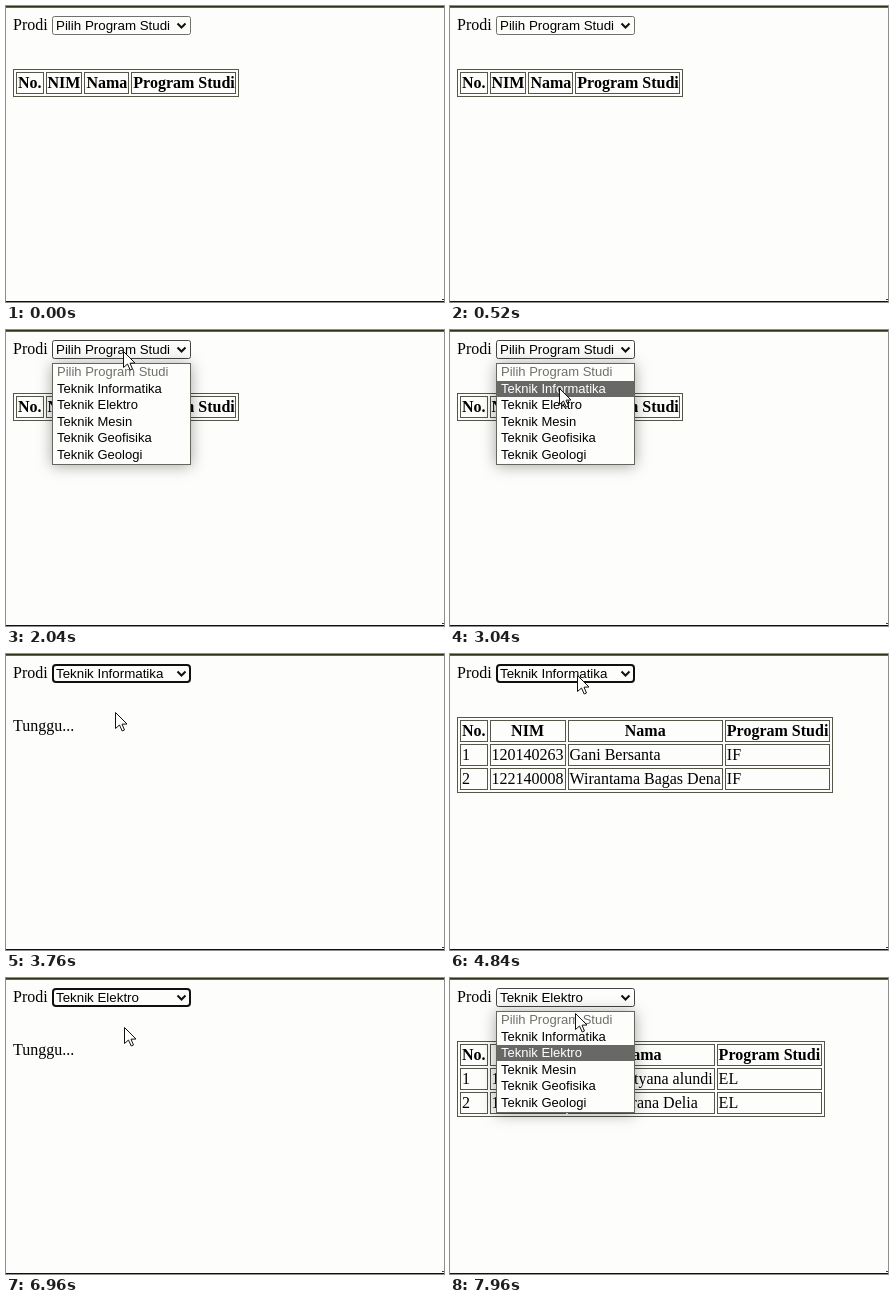
These frames come from a looping animation (438 px wide and 296 px high, 8000 ms). An HTML page with a canvas:

```html
<!DOCTYPE html>
<html lang="id">
<head>
<meta charset="utf-8">
<title>Prodi</title>
<style>
html, body { margin: 0; width: 100%; height: 100%; overflow: hidden; background: #fdfdfb; }
canvas { display: block; }
</style>
</head>
<body>
<canvas id="stage" width="438" height="296"></canvas>
<script>
const ctx = document.getElementById('stage').getContext('2d', { alpha: false });
const LOOP = 8000, WIDTH = 438, HEIGHT = 296;
const PAPER = '#fdfdfb', INK = '#000', LINE = '#55554c';
const SERIF = '16px "Liberation Serif", "Times New Roman", serif';
const BOLD = 'bold ' + SERIF;
const SELECT_FONT = '13.333px "Liberation Sans", Arial, sans-serif';
const MENU_FONT = '13px "Liberation Sans", Arial, sans-serif';
const ROW = 24, OPTION = 16.5;

const OPTIONS = ['Pilih Program Studi', 'Teknik Informatika', 'Teknik Elektro',
  'Teknik Mesin', 'Teknik Geofisika', 'Teknik Geologi'];
const HEADERS = ['No.', 'NIM', 'Nama', 'Program Studi'];
const STUDENTS = {
  empty: [],
  informatika: [
    ['1', '120140263', 'Gani Bersanta', 'IF'],
    ['2', '122140008', 'Wirantama Bagas Dena', 'IF']
  ],
  elektro: [
    ['1', '120130027', 'Hendra setyana alundi', 'EL'],
    ['2', '121130045', 'Wulan Kirana Delia', 'EL']
  ]
};

// Page states, each holding from its start time.
const STATES = [
  { at: 0, selected: 0, view: 'empty' },
  { at: 1960, selected: 0, view: 'empty', open: true },
  { at: 3120, selected: 1, view: 'wait', focus: true },
  { at: 4160, selected: 1, view: 'informatika', focus: true },
  { at: 5080, selected: 1, view: 'informatika', open: true },
  { at: 5960, selected: 2, view: 'wait', focus: true },
  { at: 7080, selected: 2, view: 'elektro', focus: true },
  { at: 7840, selected: 2, view: 'elektro', open: true }
];

// The pointer enters from above, then eases to each spot and rests there.
const ENTRY = { x: 124, y: -20 };
const MOVES = [
  { from: 1560, to: 2120, x: 118, y: 23 },
  { from: 2360, to: 2600, x: 110, y: 58 },
  { from: 4600, to: 4840, x: 128, y: 21 },
  { from: 5160, to: 5600, x: 113, y: 71 },
  { from: 6720, to: 6960, x: 119, y: 49 },
  { from: 7640, to: 7800, x: 127, y: 22 },
  { from: 7840, to: 7960, x: 126, y: 35 }
];

function pointerAt(t) {
  let { x, y } = ENTRY;
  for (const move of MOVES) {
    const k = Math.min(1, Math.max(0, (t - move.from) / (move.to - move.from)));
    const eased = k * k * (3 - 2 * k);
    x += (move.x - x) * eased;
    y += (move.y - y) * eased;
  }
  return { x: Math.round(x), y: Math.round(y) };
}

function rect(x, y, w, h, color) {
  ctx.fillStyle = color;
  ctx.fillRect(x, y, w, h);
}

function text(str, x, y, font, color = INK) {
  ctx.font = font;
  ctx.fillStyle = color;
  ctx.fillText(str, x, y);
}

function textWidth(str, font) {
  ctx.font = font;
  return ctx.measureText(str).width;
}

function frame(left, top, right, bottom, color) {
  ctx.strokeStyle = color;
  ctx.lineWidth = 1;
  ctx.strokeRect(left + .5, top + .5, right - left - 1, bottom - top - 1);
}

// Columns fit their widest text, as a browser lays out a bordered table.
function drawTable(students) {
  let x = 10;
  HEADERS.forEach((header, c) => {
    const headerWidth = textWidth(header, BOLD);
    const inner = Math.max(headerWidth, ...students.map(s => textWidth(s[c], SERIF)));
    const last = c === HEADERS.length - 1;
    const left = Math.round(x), end = x + inner + 4;
    const right = last ? Math.floor(end) : Math.round(end);
    [header, ...students.map(s => s[c])].forEach((str, r) => {
      const top = 66 + r * ROW;
      frame(left, top, right, top + 22, LINE);
      if (r) text(str, x + 2, top + 16, SERIF);
      else text(str, x + 2 + (inner - headerWidth) / 2, top + 16, BOLD);
    });
    x = end + 2;
  });
  frame(7, 63, Math.floor(x) + 1, 91 + students.length * ROW, LINE);
}

function drawSelect({ selected, open, focus }) {
  ctx.beginPath();
  if (focus) ctx.roundRect(47, 11, 137, 17, 3);
  else ctx.roundRect(46.5, 10.5, 138, 18, 2);
  ctx.lineWidth = focus ? 2 : 1;
  ctx.strokeStyle = focus ? '#101010' : open ? '#444' : '#70706a';
  ctx.stroke();
  text(OPTIONS[selected], 50, 24, SELECT_FONT);
  ctx.beginPath();
  ctx.moveTo(171.5, 17.5);
  ctx.lineTo(175.5, 21.5);
  ctx.lineTo(179.5, 17.5);
  ctx.lineWidth = 2;
  ctx.strokeStyle = '#111';
  ctx.stroke();
}

function drawMenu(selected, pointer) {
  ctx.save();
  ctx.shadowColor = 'rgba(0, 0, 0, .35)';
  ctx.shadowBlur = 14;
  ctx.shadowOffsetY = 1;
  rect(46, 33, 139, 102, PAPER);
  ctx.restore();
  const hovered = Math.floor((pointer.y - 34) / OPTION);
  const active = hovered > 0 ? hovered : selected;
  OPTIONS.forEach((label, i) => {
    const top = Math.round(34 + i * OPTION);
    const lit = i > 0 && i === active;
    if (lit) rect(47, top, 137, 16, '#686866');
    text(label, 51, top + 12, MENU_FONT, lit ? '#fff' : i ? INK : '#70706a');
  });
  frame(46, 33, 185, 135, '#66665f');
}

function drawPointer({ x, y }) {
  ctx.save();
  ctx.translate(x - .5, y + .5);
  ctx.fillStyle = '#fff';
  ctx.strokeStyle = '#111';
  ctx.lineWidth = 1;
  const arrow = new Path2D('M0 0V16L4 12.5L6.7 18.5L9 17.5L6.5 11.7L11.5 11.5Z');
  ctx.fill(arrow);
  ctx.stroke(arrow);
  ctx.restore();
}

function draw(t) {
  const state = STATES.filter(s => s.at <= t).pop();
  const pointer = pointerAt(t);
  rect(0, 0, WIDTH, HEIGHT, PAPER);
  text('Prodi', 7, 24, SERIF);
  drawSelect(state);
  if (state.view === 'wait') text('Tunggu...', 7, 77, SERIF);
  else drawTable(STUDENTS[state.view]);
  if (state.open) drawMenu(state.selected, pointer);
  drawPointer(pointer);
  rect(0, 0, WIDTH, 1, '#33331a');
  rect(0, 1, WIDTH, 1, '#66663a');
  rect(0, HEIGHT - 1, WIDTH, 1, '#111');
  rect(WIDTH - 2, HEIGHT - 3, 2, 1, '#33331a');
}

function tick() {
  draw(performance.now() % LOOP);
  requestAnimationFrame(tick);
}
tick();
</script>
</body>
</html>
```
